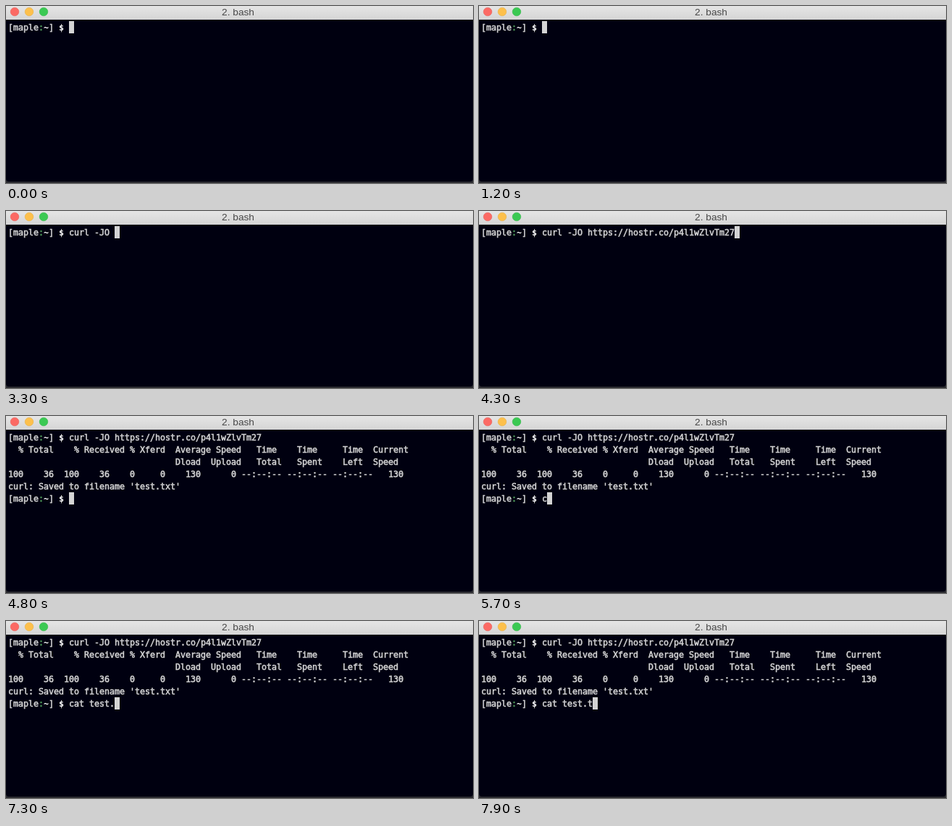
Animation, 645 px wide and 246 px high, one loop 8000 ms. Source, as an HTML page with a canvas:

```html
<!DOCTYPE html>
<html lang="en">
<head>
<meta charset="utf-8">
<title>Terminal</title>
<style>
html, body { margin: 0; width: 645px; height: 246px; overflow: hidden; background: #000010; }
canvas { display: block; }
</style>
</head>
<body>
<canvas id="stage" width="645" height="246"></canvas>
<script>
const ctx = document.getElementById('stage').getContext('2d');
const W = 645, H = 246, LOOP = 8000;
const CELL = 7, ROW = 17, LEFT = 3, TOP = 21;
const MONO = '11.63px "DejaVu Sans Mono", "Noto Sans Mono", monospace';
const GREY = '#d2d2d2', WHITE = '#ffffff';

// [time, text typed at that time]
const CURL = [[1500, 'c'], [1600, 'u'], [1700, 'r'], [1800, 'l'], [1900, ' '],
  [2300, '-'], [2700, 'J'], [2800, 'O'], [3100, ' '],
  [3800, 'https://hostr.co/p4l1wZlvTm27']];
const CAT = [[5700, 'c'], [5800, 'a'], [5900, 't'], [6100, ' '], [6300, 't'],
  [6500, 'e'], [6600, 's'], [6700, 't'], [7100, '.'], [7900, 't']];

const HEADER = [
  '  % Total    % Received % Xferd  Average Speed   Time    Time     Time  Current',
  '                                 Dload  Upload   Total   Spent    Left  Speed'];
const RESULT = [
  '100    36  100    36    0     0    130      0 --:--:-- --:--:-- --:--:--   130',
  "curl: Saved to filename 'test.txt'"];
const ENTER = 4500, HEAD_AT = 4600, DONE = 4800;

const typed = (keys, t) => keys.filter(k => k[0] <= t).map(k => k[1]).join('');

function write(text, col, row, color = GREY, bold = false) {
  ctx.font = (bold ? 'bold ' : '') + MONO;
  ctx.fillStyle = ctx.strokeStyle = color;
  ctx.lineWidth = 0.55;
  [...text].forEach((ch, i) => {
    const x = LEFT + (col + i) * CELL, y = TOP + row * ROW + 13;
    ctx.fillText(ch, x, y);
    if (!bold) ctx.strokeText(ch, x, y);
  });
}

function prompt(row, command) {
  write('[maple', 0, row);
  write(':', 6, row, '#4f9a5a');
  write('~', 7, row, WHITE, true);
  write(']', 8, row);
  write('$', 10, row, WHITE, true);
  write(command, 12, row);
  return 12 + command.length;
}

function cursor(col, row) {
  ctx.fillStyle = '#d4d4d4';
  ctx.fillRect(LEFT + col * CELL, TOP + row * ROW, CELL, ROW);
}

function light(x, fill, edge) {
  ctx.beginPath();
  ctx.arc(x, 8, 5.8, 0, Math.PI * 2);
  ctx.fillStyle = fill;
  ctx.fill();
  ctx.strokeStyle = edge;
  ctx.lineWidth = 0.6;
  ctx.stroke();
}

function frame() {
  ctx.fillStyle = '#2b2b30';
  ctx.fillRect(0, 0, W, H);
  ctx.fillStyle = '#000010';
  ctx.beginPath();
  ctx.roundRect(0, 0, W, H - 2, [0, 0, 4, 4]);
  ctx.fill();

  const bar = ctx.createLinearGradient(0, 0, 0, 19);
  bar.addColorStop(0, '#e5e5e5');
  bar.addColorStop(1, '#d5d5d5');
  ctx.fillStyle = bar;
  ctx.fillRect(0, 0, W, 19);
  light(12, '#fb6a64', '#e85f5a');
  light(32, '#fdc04c', '#e6af45');
  light(52, '#3bc953', '#35b84a');

  ctx.font = '13.7px "Liberation Sans", Arial, sans-serif';
  ctx.fillStyle = '#484848';
  ctx.textAlign = 'center';
  ctx.fillText('2. bash', 320.5, 13);
  ctx.textAlign = 'left';
}

function draw(t) {
  frame();
  let col = prompt(0, typed(CURL, t)), row = 0;
  if (t >= ENTER) { col = 0; row = 1; }
  if (t >= HEAD_AT) {
    HEADER.forEach((line, i) => write(line, 0, i + 1));
    row = 3;
  }
  if (t >= DONE) {
    RESULT.forEach((line, i) => write(line, 0, i + 3));
    row = 5;
    col = prompt(row, typed(CAT, t));
  }
  cursor(col, row);
}

const start = performance.now();
function tick() {
  draw((performance.now() - start) % LOOP);
  requestAnimationFrame(tick);
}
tick();
</script>
</body>
</html>
```
